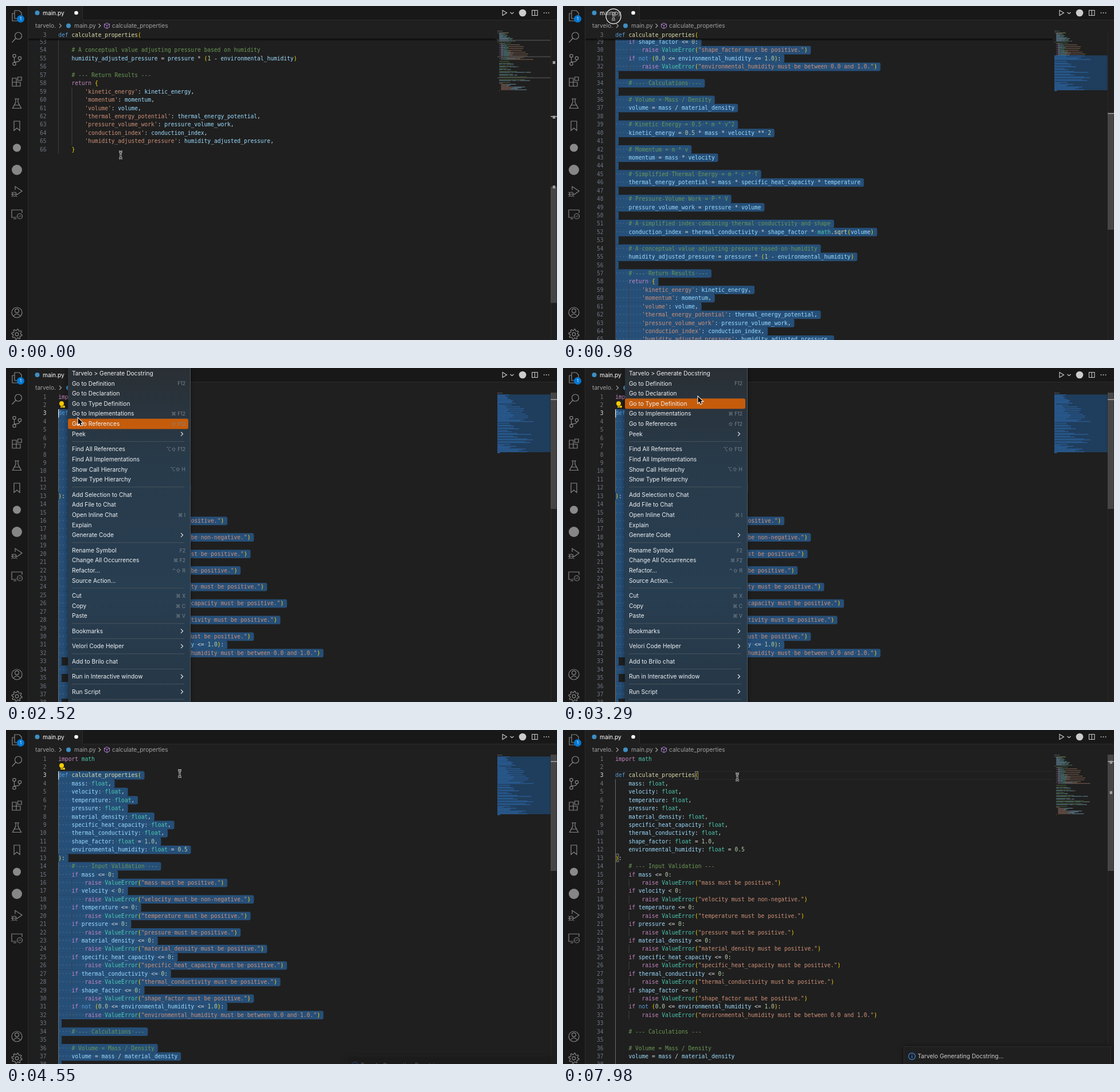
An HTML page with a canvas for the animation above (8000 ms loop, 961 px wide and 583 px high).

```html
<!DOCTYPE html>
<html lang="en">
<head>
<meta charset="utf-8">
<title>Editor</title>
<style>
html, body { margin: 0; width: 100%; height: 100%; overflow: hidden; background: #1f1f1f; }
canvas { display: block; }
</style>
</head>
<body>
<canvas id="stage" width="961" height="583"></canvas>
<script>
const ctx = document.getElementById('stage').getContext('2d');
const LOOP = 8000, W = 961, H = 583;
const LEFT = 91.3, TOP = 43, CW = 5.78, LH = 14.43;
const MAP_X = 857, MAP_ROW = 1.6, MAP_CW = 0.79;
const MONO = '9.6px "DejaVu Sans Mono", monospace';
const UI = 'Inter, "DejaVu Sans", sans-serif';

const CODE = `import math

def calculate_properties(
    mass: float,
    velocity: float,
    temperature: float,
    pressure: float,
    material_density: float,
    specific_heat_capacity: float,
    thermal_conductivity: float,
    shape_factor: float = 1.0,
    environmental_humidity: float = 0.5
):
    # --- Input Validation ---
    if mass <= 0:
        raise ValueError("mass must be positive.")
    if velocity < 0:
        raise ValueError("velocity must be non-negative.")
    if temperature <= 0:
        raise ValueError("temperature must be positive.")
    if pressure <= 0:
        raise ValueError("pressure must be positive.")
    if material_density <= 0:
        raise ValueError("material_density must be positive.")
    if specific_heat_capacity <= 0:
        raise ValueError("specific_heat_capacity must be positive.")
    if thermal_conductivity <= 0:
        raise ValueError("thermal_conductivity must be positive.")
    if shape_factor <= 0:
        raise ValueError("shape_factor must be positive.")
    if not (0.0 <= environmental_humidity <= 1.0):
        raise ValueError("environmental_humidity must be between 0.0 and 1.0.")

    # --- Calculations ---

    # Volume = Mass / Density
    volume = mass / material_density

    # Kinetic Energy = 0.5 * m * v^2
    kinetic_energy = 0.5 * mass * velocity ** 2

    # Momentum = m * v
    momentum = mass * velocity

    # Simplified Thermal Energy = m * c * T
    thermal_energy_potential = mass * specific_heat_capacity * temperature

    # Pressure-Volume Work = P * V
    pressure_volume_work = pressure * volume

    # A simplified index combining thermal conductivity and shape
    conduction_index = thermal_conductivity * shape_factor * math.sqrt(volume)

    # A conceptual value adjusting pressure based on humidity
    humidity_adjusted_pressure = pressure * (1 - environmental_humidity)

    # --- Return Results ---
    return {
        'kinetic_energy': kinetic_energy,
        'momentum': momentum,
        'volume': volume,
        'thermal_energy_potential': thermal_energy_potential,
        'pressure_volume_work': pressure_volume_work,
        'conduction_index': conduction_index,
        'humidity_adjusted_pressure': humidity_adjusted_pressure,
    }`.split('\n');
const LAST = CODE.length - 1;

const WORDS = {
  import: '#c586c0', if: '#c586c0', raise: '#c586c0', return: '#c586c0',
  def: '#569cd6', not: '#569cd6', float: '#4ec9b0', ValueError: '#4ec9b0', math: '#4ec9b0',
  calculate_properties: '#dcdcaa', sqrt: '#dcdcaa'
};
const TOKEN = /(#.*)|('[^']*'|"[^"]*")|(\d[\d.]*)|([A-Za-z_]\w*)|([(){}])|(\S)/g;
const tokens = CODE.map(line => [...line.matchAll(TOKEN)].map(m => ({
  text: m[0], col: m.index,
  color: m[1] ? '#6a9955' : m[2] ? '#ce9178' : m[3] ? '#b5cea8'
    : m[4] ? WORDS[m[4]] || '#9cdcfe' : m[5] ? '#ffd700' : '#d4d4d4'
})));
const indents = CODE.map((line, i) => line ? line.search(/\S/) : i > 2 ? 4 : 0);

// label|shortcut, '>' opens a submenu, '-' is a separator
const MENU = `Tarvelo > Generate Docstring
Go to Definition|F12
Go to Declaration
Go to Type Definition
Go to Implementations|⌘ F12
Go to References|⇧ F12
Peek|>
-
Find All References|⌥⇧ F12
Find All Implementations
Show Call Hierarchy|⌥⇧ H
Show Type Hierarchy
-
Add Selection to Chat
Add File to Chat
Open Inline Chat|⌘ I
Explain
Generate Code|>
-
Rename Symbol|F2
Change All Occurrences|⌘ F2
Refactor...|⌃⇧ R
Source Action...
-
Cut|⌘ X
Copy|⌘ C
Paste|⌘ V
-
Bookmarks|>
-
Velori Code Helper|>
-
Add to Brilo chat
-
Run in Interactive window|>
-
Run Script|>
-`.split('\n');

const MOUSE = [
  [0, 200, 260], [70, 200, 260], [210, 121, 252], [280, 121, 252], [540, 88, 18],
  [1480, 88, 18], [1680, 92, 80], [1750, 92, 80], [1890, 107, 82], [2380, 107, 82],
  [2870, 200, 110], [3150, 200, 110], [3290, 235.5, 50], [3500, 225, 8], [3920, 225, 8],
  [4480, 303, 76], [4690, 303, 76], [4970, 304, 82], [LOOP, 304, 82]
];
const PRESSES = [[250, 1850], [2100, 2200], [3920, 4000], [5110, 5220]];
const BLINKS = [5670, 6125, 6700, 7205, 7765];
const DESELECT = 5180;

const clamp = (v, a, b) => Math.min(b, Math.max(a, v));
const within = (t, a, b) => t >= a && t < b;

function mouseAt(t) {
  const i = MOUSE.findIndex(k => k[0] > t);
  const [t0, x0, y0] = MOUSE[i - 1], [t1, x1, y1] = MOUSE[i];
  const p = (t - t0) / (t1 - t0), e = p * p * (3 - 2 * p);
  return { x: x0 + (x1 - x0) * e, y: y0 + (y1 - y0) * e };
}

function box(x, y, w, h, color) {
  ctx.fillStyle = color;
  ctx.fillRect(x, y, w, h);
}
function dot(x, y, r, color) {
  ctx.fillStyle = color;
  ctx.beginPath();
  ctx.arc(x, y, r, 0, 7);
  ctx.fill();
}
function ring(x, y, r, color, width = 1.2) {
  ctx.strokeStyle = color;
  ctx.lineWidth = width;
  ctx.beginPath();
  ctx.arc(x, y, r, 0, 7);
  ctx.stroke();
}
function path(d, color, width = 1.2) {
  ctx.strokeStyle = color;
  ctx.lineWidth = width;
  ctx.stroke(new Path2D(d));
}
function label(text, x, y, color, size = 10.2, align = 'left') {
  ctx.font = `${size}px ${UI}`;
  ctx.textAlign = align;
  ctx.fillStyle = color;
  ctx.fillText(text, x, y + size * 0.36);
}
function mono(text, x, y, color, align = 'left', style = '') {
  ctx.font = style + MONO;
  ctx.textAlign = align;
  ctx.fillStyle = color;
  ctx.fillText(text, x, y + 3.3);
}
const chevron = (x, y, color) => path(`M${x - 2} ${y - 3.5}l3.5 3.5l-3.5 3.5`, color);

function drawActivityBar() {
  const c = '#868686';
  box(0, 0, 38, H, '#181818');
  box(38, 0, 1, H, '#2b2b2b');
  path('M15 8h8l4 4v10h-12z M15 13h-4v13h11v-4', c);
  dot(25.5, 22.5, 6.5, '#0078d4');
  label('1', 25.5, 22.5, '#fff', 7.5, 'center');
  ring(21.5, 52, 6, c);
  path('M17 56.5l-6.5 7', c);
  ring(14.5, 87, 2.7, c); ring(24, 91, 2.7, c); ring(14.5, 101, 2.7, c);
  path('M14.5 90v8 M24 94q0 4 -9 3.5', c);
  path('M11 126h7v14h-7z M11 133h14v7h-14 M20.5 124h6.5v6h-6.5z', c);
  path('M15 162h8 M17 162v6l-5.5 10.5h15l-5.5-10.5v-6 M14 173h10', c);
  path('M14 201h10v16.5l-5-4.5l-5 4.5z', c);
  dot(19, 247.5, 7, '#8a8a8a');
  dot(19, 286, 9, '#868686');
  path('M16 321v-6l12 8l-9 6.5', c);
  ring(14.5, 328.5, 3.5, c);
  path('M9.5 325l2 1 M9 329h2 M9.5 333l2-1 M19.5 333l-2-1 M11 328.5h7', c, 1);
  path('M18 369h-8v-13h18v5 M13 371.5h5', c);
  ring(24, 367, 4.5, c);
  path('M22 366l1.5 1.5l-1.5 1.5 M26 365l-1.5 1.5l1.5 1.5', c, 0.8);
  ring(19, 535, 9, c); ring(19, 532, 3.4, c);
  path('M13 541.5q6 -8 12 0', c);
  ring(19, 573, 2.8, c);
  ctx.beginPath();
  for (let i = 0; i < 32; i++) {
    const a = (i + 0.5) * Math.PI / 16, r = i % 4 < 2 ? 9 : 6.5;
    ctx.lineTo(19 + r * Math.cos(a), 573 + r * Math.sin(a));
  }
  ctx.closePath();
  ctx.stroke();
}

function drawHeader(scoped) {
  const c = '#cccccc', g = '#a0a0a0';
  box(39, 0, W, 24, '#181818');
  box(39, 0, 95, 25, '#1f1f1f');
  box(133, 0, 1, 24, '#2b2b2b');
  box(134, 24, W, 1, '#2b2b2b');
  dot(54.5, 12, 4, '#3d8fc4');
  label('main.py', 64, 12, '#fff');
  dot(122.5, 12, 3.3, '#fff');
  path('M866 7.5v9l7.5-4.5z M879.5 11l3 2.5l3-2.5', c, 1.1);
  dot(901, 12, 6.3, c);
  path('M917.5 7.5h9.5v9h-9.5z M922.2 7.5v9', c, 1.1);
  for (const x of [938.5, 942.5, 946.5]) dot(x, 12, 0.9, c);

  label('tarvelo.', 51, 34.5, g);
  chevron(95, 34.5, g);
  dot(109, 34.5, 4, '#3d8fc4');
  label('main.py', 119, 34.5, g);
  chevron(163.5, 34.5, g);
  if (!scoped) return label('...', 170, 34.5, g);
  path('M176 29.5l4.5 2.3v5.2l-4.5 2.5l-4.5-2.5v-5.2z M171.5 31.8l4.5 2.4l4.5-2.4 M176 34.2v5', '#b180d7', 1);
  label('calculate_properties', 185, 34.5, g);
}

function drawTokens(i, y) {
  for (const k of tokens[i]) mono(k.text, LEFT + k.col * CW, y, k.color);
}

function drawCode(t, s) {
  ctx.save();
  ctx.beginPath();
  ctx.rect(39, TOP, 815, H - TOP);
  ctx.clip();
  if (t >= DESELECT) {
    ctx.strokeStyle = '#2a2a2a';
    ctx.lineWidth = 1;
    ctx.strokeRect(91.5, 72.5, 765, 14);
  }
  for (let i = 0; i <= LAST; i++) {
    const y = 50.2 + i * LH - s.scroll, top = y - LH / 2;
    if (y < TOP - LH || y > H + LH) continue;
    const picked = i >= s.from;
    if (picked) {
      ctx.fillStyle = '#264f78';
      ctx.beginPath();
      ctx.roundRect(LEFT, top, (CODE[i].length + (i < LAST ? 1 : 0)) * CW, LH + 0.3, [0, 3, 3, 0]);
      ctx.fill();
    }
    if (indents[i] >= 4) box(91, top, 1, LH, s.line === 2 ? '#6a6a6a' : '#404040');
    if (indents[i] >= 8) box(114.5, top, 1, LH, '#404040');
    if (picked) mono(CODE[i].replace(/\S/g, ' ').replace(/ (?! *$)|^ +/g, m => m.replace(/ /g, '\u00b7'))
      .split('').map((ch, n) => CODE[i][n] === ' ' ? '\u00b7' : ' ').join(''), LEFT, y, 'rgba(227,228,226,0.22)');
    drawTokens(i, y);
    mono(i + 1, 70.5, y, i === s.line ? '#e0e0e0' : '#6e7681', 'right');
    if (i === LAST && s.selecting)
      mono("Pin selection to current chat prompt (Cmd+Option+X) | Don't show this again (Option+/)",
        LEFT + 10 * CW, y, '#6f6f6f', 'left', 'italic ');
  }
  if (s.scroll > 2 * LH) {
    box(39, TOP, 815, 14.5, '#1f1f1f');
    drawTokens(2, 50.2);
    mono(3, 70.5, 50.2, '#6e7681', 'right');
    box(39, 57, 815, 1.6, '#0c0c0c');
    box(39, 58.6, 815, 2, 'rgba(0,0,0,0.25)');
  }
  if (s.bulb) {
    dot(97, 62, 4, '#ffcc00');
    box(95, 65, 4, 4, '#ffcc00');
    box(95, 66.5, 4, 0.8, '#1f1f1f');
    dot(101, 67.5, 2, '#ffcc00');
  }
  if (t >= DESELECT) {
    ctx.strokeStyle = '#888';
    ctx.lineWidth = 1;
    ctx.strokeRect(230.5, 72.5, 5, 13.5);
    ctx.strokeRect(91.8, 216.5, 5, 13.5);
    if (BLINKS.filter(b => b <= t).length % 2 === 0) box(235.3, 72, 1.4, 14.5, '#d8d8d8');
  } else if (t >= 1500) {
    box(91, 72 + (s.line - 2) * LH, 1.4, 14.5, '#d8d8d8');
  }
  ctx.restore();
}

function drawMinimap(t, s) {
  if (s.selecting) box(MAP_X, TOP + s.from * MAP_ROW, 92.5, (LAST - s.from) * MAP_ROW, '#1f3d5c');
  for (let i = 0; i <= LAST; i++) {
    const y = TOP + i * MAP_ROW;
    if (i >= s.from) {
      box(MAP_X, y, (CODE[i].length + 1) * MAP_CW, MAP_ROW, '#28588c');
      continue;
    }
    ctx.globalAlpha = 0.5;
    for (const k of tokens[i]) box(MAP_X + k.col * MAP_CW, y + 0.2, k.text.length * MAP_CW, 1.1, k.color);
    ctx.globalAlpha = 1;
  }
  if (t < 210) for (const n of [10, 28, 51]) box(MAP_X, TOP + n * MAP_ROW, 92.5, 1.5, '#4a4a4a');

  const ruler = n => TOP + (n + 0.5) * 5.3;
  box(950, TOP, 1, H, '#292929');
  box(950, TOP + s.scroll * 0.369, 10.5, 203, 'rgba(121,121,121,0.42)');
  const marks = t < 210 ? [10, 28, 51] : t >= DESELECT ? [2, 12] : [];
  for (const n of marks) box(953.5, ruler(n) - 2.5, 4.5, 5, '#a0a0a0');
  box(950, ruler(s.line) - 2, 11, 1.6, '#a0a0a0');
}

function drawMenu(mouseY) {
  const bg = ctx.createLinearGradient(0, 0, 0, H);
  bg.addColorStop(0, '#2a2f34');
  bg.addColorStop(0.12, '#29343e');
  bg.addColorStop(0.3, '#283b4b');
  bg.addColorStop(0.65, '#283e51');
  bg.addColorStop(1, '#263746');
  ctx.save();
  ctx.shadowColor = 'rgba(0,0,0,0.5)';
  ctx.shadowBlur = 10;
  box(108, -10, 213, H + 20, bg);
  ctx.restore();
  box(321, 0, 1, H, '#4b545c');
  let y = 9.2;
  for (const row of MENU) {
    if (row === '-') {
      box(115, y - 4.9, 196, 1, '#47535e');
      y += 8.8;
      continue;
    }
    const [name, key] = row.split('|');
    if (Math.abs(mouseY + 6 - y) < 8.8) {
      ctx.fillStyle = '#c55c0c';
      ctx.beginPath();
      ctx.roundRect(108, y - 9, 210, 18, 3);
      ctx.fill();
    }
    label(name, 115, y, '#f0f2f4');
    if (key === '>') chevron(307, y, '#e4e6e8');
    else if (key) label(key, 313, y + 0.5, '#7b858e', 8.6, 'right');
    y += 17.65;
  }
}

function drawNotice(t) {
  const p = clamp((t - 4480) / 210, 0, 1);
  if (!p) return;
  ctx.save();
  ctx.globalAlpha = p;
  ctx.translate(0, 36 * (1 - p) ** 2);
  ctx.shadowColor = 'rgba(0,0,0,0.6)';
  ctx.shadowBlur = 8;
  box(594, 553, 361, 50, '#1f1f1f');
  ctx.shadowBlur = 0;
  ctx.strokeStyle = '#2d2d2d';
  ctx.lineWidth = 1;
  ctx.strokeRect(594.5, 552.5, 361, 50);
  ring(608.5, 569.5, 5.8, '#3794ff', 1.1);
  box(608, 568.5, 1.2, 4.2, '#3794ff');
  box(608, 566, 1.2, 1.3, '#3794ff');
  label('Tarvelo Generating Docstring...', 618.5, 569.5, '#cccccc');
  ctx.restore();
}

function drawMouse(t, m, arrow) {
  if (PRESSES.some(([a, b]) => within(t, a, b))) {
    dot(m.x, m.y, 13, 'rgba(60,60,60,0.35)');
    ring(m.x, m.y, 13, 'rgba(0,0,0,0.5)', 3);
    ring(m.x, m.y, 13, '#e0e0e0', 1.5);
  }
  ctx.save();
  ctx.translate(m.x, m.y);
  if (arrow) {
    const d = 'M0 0v11l2.6-2.4l1.8 4.2l2-0.9l-1.8-4h3.6z';
    path(d, '#fff', 2);
    ctx.fillStyle = '#000';
    ctx.fill(new Path2D(d));
  } else {
    const d = 'M-3 -6q3 0 3 2v8q0 2 -3 2 M3 -6q-3 0 -3 2v8q0 2 3 2 M-1.5 1h3';
    path(d, '#e8e8e8', 3);
    path(d, '#1a1a1a', 1.1);
  }
  ctx.restore();
}

function render(now) {
  const t = now % LOOP, m = mouseAt(t);
  const scroll = clamp(737.8 - (t - 552) * 0.807, 0, 737.8);
  const selecting = within(t, 280, DESELECT);
  const under = clamp(Math.floor((Math.max(m.y, TOP) - TOP + scroll) / LH), 0, LAST);
  const start = t < 1850 ? under : 2;
  const state = {
    scroll, selecting,
    from: selecting ? start : Infinity,
    line: t < 210 ? 28 : t < 280 ? LAST : start,
    bulb: within(t, 1680, 5390)
  };
  const menuOpen = within(t, 2200, 4060);

  box(0, 0, W, H, '#1f1f1f');
  drawCode(t, state);
  drawMinimap(t, state);
  drawHeader(!within(t, 1440, 1850));
  drawActivityBar();
  if (menuOpen) drawMenu(m.y);
  drawNotice(t);
  drawMouse(t, m, menuOpen);
}

const began = performance.now();
function tick() {
  render(performance.now() - began);
  requestAnimationFrame(tick);
}
tick();
</script>
</body>
</html>
```
